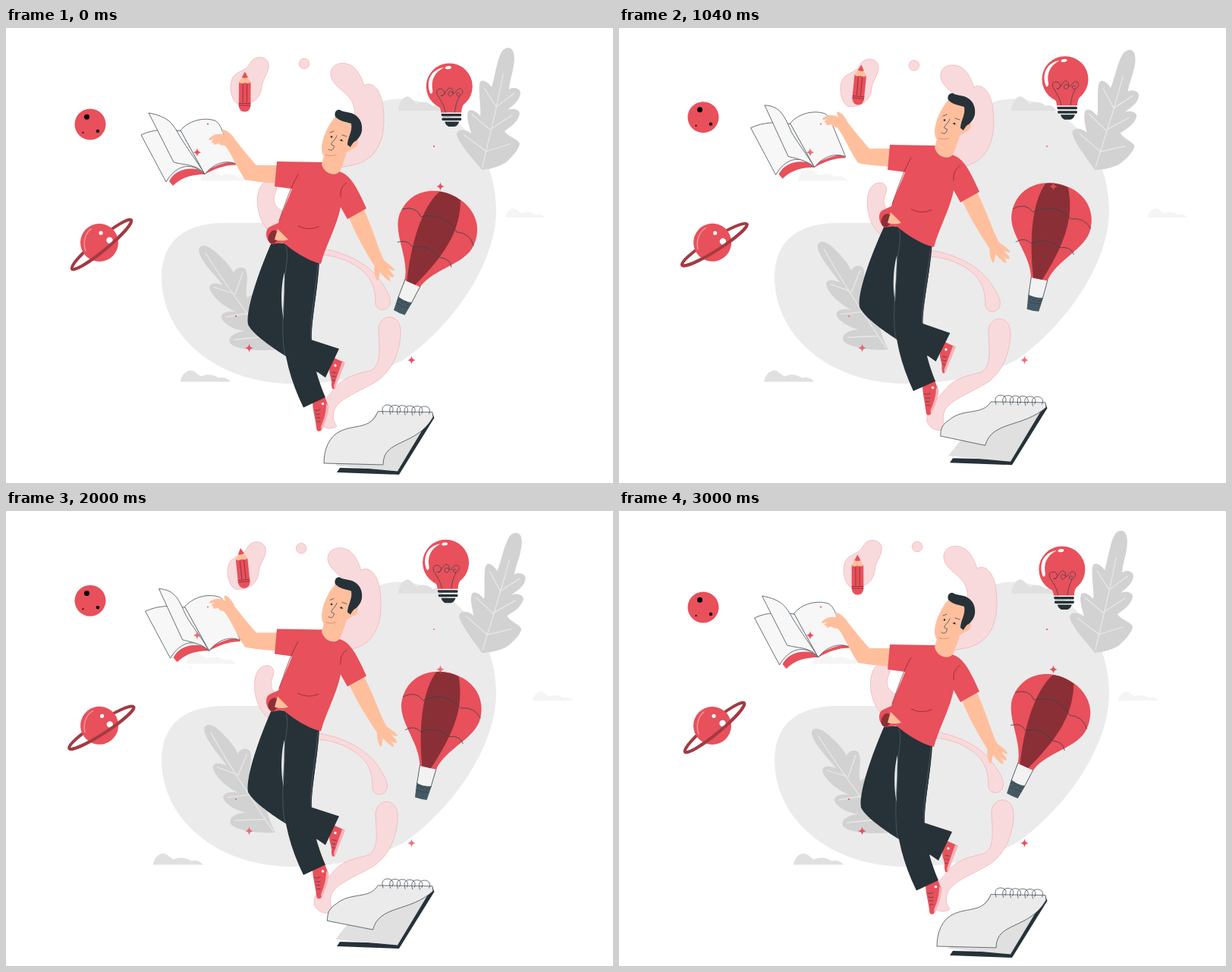
Write an HTML page that moves like this. It is 800 px wide and 600 px high and loops after 3.04 s.

```html
<!DOCTYPE html>
<html lang="en">
<head>
<meta charset="utf-8">
<title>Floating ideas</title>
<style>
html, body { margin: 0; width: 100%; height: 100%; overflow: hidden; background: #fff; }
svg { display: block; width: 800px; height: 600px; }
.red { fill: #e8505b; }
.dark { fill: #263238; }
.skin { fill: #ffbf9d; }
.deep { fill: #8b2f36; }
.leaf { fill: #d2d2d2; }
.pale { fill: #f5f5f5; }
.cloud { fill: #e0e0e0; }
.paper { fill: #f7f7f7; stroke: #59636a; stroke-width: .9; stroke-linejoin: round; }
.ln { fill: none; stroke: #37434a; stroke-width: .75; stroke-linecap: round; stroke-linejoin: round; }
.wine { stroke: #7c2b33; }
.vein { fill: none; stroke: #e8e8e8; stroke-width: 1.3; stroke-linecap: round; }
.pink { fill: #f9dadc; stroke: #f2acb1; stroke-width: .7; }
.ring { fill: none; stroke: #a33a42; stroke-width: 4; }
</style>
</head>
<body>
<svg viewBox="0 0 800 600">
<defs>
  <path id="puff" d="M0 0C1-8 6-14 13-15C18-15 22-10 27-7C35-11 45-9 50-5C57-7 63-4 66 0Z"/>
  <path id="star" class="red" d="M0-5.7C.8-1.7 1.7-.8 5.7 0C1.7.8.8 1.7 0 5.7C-.8 1.7-1.7.8-5.7 0C-1.7-.8-.8-1.7 0-5.7Z"/>
</defs>

<path fill="#ebebeb" d="M345 257C395 257 410 230 425 195C440 150 465 98 510 94C575 88 646 150 646 240C646 310 590 391 525 437C480 461 430 469 375 469C275 467 205 405 205 328C206 280 236 257 290 257Z"/>
<use href="#puff" class="cloud" transform="translate(517 109) scale(.9 1.25)"/>
<use href="#puff" class="cloud" id="cloudL"/>
<use href="#puff" class="pale" id="cloudM"/>
<use href="#puff" class="pale" id="cloudR"/>

<g id="leafR">
  <path class="leaf" d="M627 187C618 175 594 150 594 139C596 132 608 134 613 139C611 130 606 118 609 110C613 105 622 112 625 116C627 108 621 78 625 71C629 66 638 74 640 78C645 65 648 30 658 27C668 22 672 35 669 50C667 62 664 70 663 81C668 77 678 79 678 86C677 96 668 102 661 108C668 105 677 107 677 113C675 124 664 131 657 136C662 144 677 147 677 153C675 162 665 172 658 178C648 183 640 186 627 187Z"/>
  <path class="vein" d="M628 183C634 155 645 115 655 62M632 162L604 141M632 163L664 153M638 134L614 114M638 134L667 115M646 104L630 79M646 104L670 86"/>
</g>
<g id="leafL">
  <path class="leaf" d="M355 424C335 427 300 424 295 415C292 406 305 400 316 400C300 398 283 388 284 380C286 373 300 373 306 375C290 370 270 354 268 342C270 334 280 337 286 339C275 325 253 304 254 291C258 283 268 288 277 296C288 306 296 314 300 323C302 316 312 313 316 319C321 330 314 345 318 356C324 350 334 350 335 360C338 375 338 395 355 424Z"/>
  <path class="vein" d="M263 297C285 332 320 380 352 422M300 350L274 342M302 351L312 322M319 376L290 381M340 407L301 411"/>
</g>

<g id="blobs" class="pink">
  <path d="M306 101C298 96 294 82 297 70C300 56 317 58 322 46C327 36 343 36 346 47C348 58 338 66 337 78C336 92 325 102 306 101Z"/>
  <circle cx="393" cy="47" r="6.8"/>
  <path d="M428 62C427 46 445 43 456 50C466 57 470 70 472 76C480 70 492 78 496 98C501 130 497 155 480 170C468 180 455 181 440 184L440 150C460 130 464 112 455 95C446 82 430 76 428 62Z"/>
  <path d="M345 202C353 200 359 206 356 215C351 226 352 236 366 242C400 265 400 288 416 291C455 297 482 316 494 334C503 347 508 356 506 364C503 374 489 374 487 364C487 350 486 338 474 324C458 308 435 300 414 299C380 295 345 275 336 252C328 232 330 205 345 202Z"/>
  <path d="M491 400C490 388 498 381 506 381C517 382 521 393 520 405C518 430 508 452 490 465C465 480 440 488 433 503C430 514 431 518 436 525C428 531 414 528 410 516C409 498 425 486 438 470C450 458 468 455 480 452C496 446 492 420 491 400Z"/>
</g>

<g id="moon">
  <circle class="red" cx="111" cy="127" r="20.5"/>
  <circle cx="106.5" cy="117.2" r="3.5"/><circle cx="121" cy="136" r="2.2"/><circle cx="101.5" cy="138" r="1"/>
</g>
<g id="saturn">
  <ellipse class="ring" cx="126" cy="285.5" rx="50.5" ry="8" transform="rotate(-39.6 126 285.5)"/>
  <circle class="red" cx="123" cy="283" r="25"/>
  <path fill="none" stroke="#f08f96" stroke-width="1.6" stroke-linecap="round" d="M105 294C101 283 104 271 112 265"/>
  <circle cx="125" cy="270.3" r="2.6" fill="#fff"/><circle cx="136.5" cy="280" r="4.2" fill="#fff"/>
  <path class="ring" transform="rotate(-39.6 126 285.5)" d="M75.5 285.5A50.5 8 0 0 0 176.5 285.5"/>
</g>

<g id="pencil">
  <path class="red" d="M306.7 71H322.3V103Q321 110.5 314.5 110.5Q308 110.5 306.7 103Z"/>
  <path class="skin" d="M314.5 58L322.3 72Q318 74 314.5 72Q311 74 306.7 72Z"/>
  <path class="red" d="M314.5 57.5L318.5 65Q314.5 67 310.5 65Z"/>
  <path class="ln wine" d="M312 74V98M317.3 74V98M307 99.5H322M307 102H322"/>
</g>

<g id="bulb">
  <circle class="red" cx="584" cy="77" r="30.5"/>
  <path class="red" d="M566 100Q573 104 573 111.5H600Q600 104 604 99Z"/>
  <path fill="#fff" d="M558 84C553 67 562 54 577 52C565 58 559 68 562 83C562 87 559 88 558 84Z"/>
  <ellipse cx="582.5" cy="52.3" rx="4" ry="2" fill="#fff" transform="rotate(-8 582 52)"/>
  <path class="ln" d="M579 111C577 102 573 96 570 91C564 84 569 78 575 81C580 84 577 91 573 89C577 92 580 79 585 79C590 80 590 89 585 90C580 88 583 81 588 85C591 90 592 81 598 80C604 81 602 89 596 90C591 88 594 83 598 87M591 111Q592 100 597 90"/>
  <path class="dark" d="M574 113H599Q601 115 599 116.5H575Q572 115 574 113ZM575 118.5H599Q601 120 599 122H575Q573 120 575 118.5ZM578 123.5H597Q595 129 591 130H583Q579 128 578 123.5Z"/>
</g>

<g id="book">
  <path class="red" d="M-47 9L-42 15C-30 3-15 0 0 0C14-8 30-13 41-12L39-17C22-16 10-9 0-4C-18-11-38-8-47 9Z"/>
  <path class="paper" d="M-84-52C-67-60-48-60-31-57L0 0C-17-17-38-13-51 10Z"/>
  <path class="paper" d="M0 0L-32-58C-22-70-3-76 13-71C18-69 20-64 22-60L41-14C26-20 10-13 0 0Z"/>
  <path class="paper" id="leafPage"/>
</g>

<g id="balloon">
  <path d="M-11 75L-9 100H9L11 75Z" fill="#f2f2f2"/>
  <path class="ln" d="M-11 75L-9.5 100M11 75L9.5 100"/>
  <path class="red" d="M-11 76C-18 45-53 25-53-3C-53-35-28-52 0-52C28-52 53-35 53-3C53 25 18 45 11 76Z"/>
  <path class="deep" d="M-17-49.5C-27-28-28 14-8 76H4C25 20 28-14 13-50Q-2-54-17-49.5Z"/>
  <path class="ln" d="M-52.5-8Q-38-20-26-9Q0-28 25-10Q42-16 53-3M-40 34Q-30 25-20 32Q0 19 18 30Q32 25 38 35"/>
  <path fill="#455a64" d="M-10 99Q0 102 10 99L8 118Q0 119-8 118Z"/>
  <path class="ln" d="M-9 104L-5 101L-2 105L2 101L5 105L9 102M-8 108Q0 110 8 108"/>
</g>

<g id="man">
  <g id="legs">
    <path class="red" d="M430 434L446 441L434 474Q430 480 429 471C430 460 424 456 427 447Z"/>
    <path fill="#f4b4b9" d="M443 440L447 441.5L433 477L432 472Z"/>
    <path class="ln" d="M430 454L435 455M430 459L434 460M430 464L433 465"/>
    <circle cx="434" cy="445" r="1.7" fill="#fff"/>
    <path class="red" d="M404 492L420 486L425 499C424 510 418 525 415 531Q409 534 409 526C407 512 404 502 404 492Z"/>
    <path fill="#f4b4b9" d="M422 495L425.5 499C425 511 420 522 416 531L415 526C420 514 422 506 422 495Z"/>
    <path class="ln" d="M407 504Q411 506 414 503M408 509Q411 511 414 509M409 514L414 514M410 519L414 519"/>
    <circle cx="417.5" cy="495.5" r="1.8" fill="#fff"/>
    <path class="dark" d="M350 283L370 284L412 308C412 340 403 380 402 411L439 423L421 461L411 454C385 445 327 409 319 391C315 368 340 305 350 283Z"/>
    <path fill="#e6e6e6" d="M367 322C362 340 362 368 366 384Q367 360 367 322Z"/>
    <path class="dark" d="M368 285L413 309C411 345 402 385 403 412C403 440 413 468 421 487L392 500.5C375 465 365 430 366 395C366 360 369 310 368 285Z"/>
    <path class="ln" style="stroke:#536067" d="M369 288C374 303 366 320 367 350C364 385 364 420 368 432M411 312C408 350 400 385 402 411"/>
  </g>
  <g id="armR" class="skin">
    <path d="M446 240L470 236C483 262 488 285 498 306L486 315C474 295 462 275 452 250Z"/>
    <path d="M486 312C484 320 486 328 489 333C492 333 491 327 493 322C498 328 503 333 506 334C508 331 503 326 501 323C505 328 510 330 511 328C511 324 505 320 504 317C508 319 512 322 512 319C508 313 502 310 496 304Z"/>
  </g>
  <path class="skin" d="M360 181L358 205C340 204 325 202 315 200C303 182 297 165 288 154L298 142C308 155 320 170 330 181Z"/>
  <path id="hand" class="skin" d="M301 146C297 139 291 135 286 134C283 136 287 139 288 141C280 138 271 141 267 147C268 149 272 147 275 146C270 149 269 152 274 151C271 155 277 154 280 152C283 156 287 154 291 156Q299 154 301 146Z"/>

  <path class="red" d="M357 176L417 177L441 190C453 194 462 208 475 238L450 252L441 236C436 262 422 285 415 311C395 306 378 293 365 283L350 285C341 279 341 265 348 262L359 257C365 240 372 225 377 212L354 209Z"/>
  <ellipse class="deep" cx="352.5" cy="275.5" rx="6.5" ry="9" transform="rotate(20 352 275)"/>
  <path class="skin" d="M358 265L372 279Q363 282 354 279Z"/>
  <path class="ln wine" d="M385 193C375 210 368 232 360 254M385 261Q398 268 412 262M441 223C440 213 444 207 449 204"/>

  <path class="skin" d="M421 160L416 180C421 195 437 196 441 187L449 165Z"/>
  <path class="skin" d="M434 117C424 128 416 147 416 159C416 172 425 175 436 171C446 166 455 160 461 157C466 152 464 145 460 142L457 123Z"/>
  <path class="dark" d="M434 117C432 111 436 107 440 108C446 112 453 110 459 114C468 119 470 128 469 136C467 144 463 147 461 149C458 150 456 153 454 157L450 154C450 144 457 137 455 126C448 124 440 123 434 117Z"/>
  <path class="ln" d="M427 138L432 136M443 141L449 143M436 142C435 147 427 152 429 154L433 156M425 160C429 163 432 160 432 157M440 148L444 149"/>
  <path d="M421 167Q428 170 435 167" fill="none" stroke="#ef986f" stroke-width="1.2"/>
  <circle class="dark" cx="429" cy="143.5" r="1.3"/><circle class="dark" cx="442" cy="148" r="1.2"/>
</g>

<g id="pad">
  <path class="dark" d="M440 580L436 586L518 589L564.5 514L562 508L515 582Z"/>
  <path class="cloud" d="M490 506L562 508L516 584.5L434 577Z"/>
  <path id="sheet" class="ln" style="fill:#ebebeb"/>
  <g id="rings"></g>
</g>

<g id="sparks"></g>
</svg>
<script>
const LOOP = 3040, STEP = 40, LEAD = 30;
const el = Object.fromEntries([...document.querySelectorAll('[id]')].map(n => [n.id, n]));
const put = (id, v) => el[id].setAttribute('transform', v);
const move = (id, x, y) => put(id, `translate(${x} ${y})`);
const turn = (id, a, x, y) => put(id, `rotate(${a} ${x} ${y})`);

el.rings.innerHTML = [0, 1, 2, 3, 4, 5].map(i =>
  `<path class="ln" transform="translate(${497 + i * 9.7} ${509 + i * .4})" d="M0 0C-3-9 1-12 6-12C12-12 15-7 12-2"/>`).join('');
el.sparks.innerHTML =
  [[252, 164], [572.5, 209], [320.5, 422], [534.5, 438]].map(([x, y]) => `<use href="#star" x="${x}" y="${y}"/>`).join('') +
  [[266, 126.5], [564, 156], [303, 380]].map(([x, y]) => `<circle class="red" cx="${x}" cy="${y}" r="1.1"/>`).join('');

// Fill a path template: [from, to] pairs blend by k.
const blend = (k, parts) => parts.map(v => Array.isArray(v) ? v[0] + (v[1] - v[0]) * k : v).join(' ');

function draw(now) {
  const t = Math.floor(now % LOOP / STEP) * STEP;
  const a = 2 * Math.PI * (t + LEAD) / LOOP;
  const s = Math.sin(a), c = Math.cos(a), c2 = Math.cos(2 * a);
  const p = (1 - c) / 2, mid = s * s;
  const rise = -11.7 * p;

  move('cloudL', 230 - 48.5 * p, 466.5);
  move('cloudM', 256 - 25 * p, 201.5);
  put('cloudR', `translate(${658 + 48.5 * p} 250) scale(.8)`);
  turn('leafR', 5.2 * p, 627, 187);
  turn('leafL', 4.1 * p, 354, 424);
  move('blobs', -5.2 * p, 3 * p);

  move('moon', 0, rise);
  turn('saturn', 9 * p, 124.5, 284);
  put('pencil', `translate(0 ${rise}) rotate(${6.8 * s} 314.5 110)`);
  move('bulb', 5 * s, rise);
  move('book', 262.4 - 6 * s, 193 + rise);
  put('balloon', `translate(${569.5 - 2.6 * c - 2.4 * s} ${263 + 5 * c - 4.2 * s}) rotate(${16.3 + 6.5 * c - .5 * s + 1.5 * c2})`);

  move('man', 0, -27.5 * p);
  turn('legs', 1.1 * Math.max(0, Math.cos(a - 2.1)), 378, 285);
  turn('armR', -3.5 * mid, 458, 235);
  turn('hand', 15 * mid, 298, 148);

  move('pad', 0, -16 * p);
  el.leafPage.setAttribute('d', blend(p, ['M', [-74, -63.5], [-81, -82], 'C', [-47, -44], [-76, -82],
    [-42, -39], [-66, -68], [-34, -29], [-52, -44], 'C', -22, -32, -10, -17, 0, 0,
    'C', -10, [-14, -9], -28, [-12, -12], [-41, -33], [-16, -14], 'Z']));
  el.sheet.setAttribute('d', blend(p, ['M', 490, 506, 'C', [481, 478], [530, 523], [460, 453], [522, 511],
    [440, 434], [532, 529], 'C', [426, 426], [539, 535], [419, 425], [555, 537], [419, 425], [574, 545],
    'L', [497, 479], [576, 560], 'C', [497, 490], [541, 528], [540, 530], [553, 537], 563, 513, 'L', 562, 507, 'Z']));
  el.sparks.setAttribute('opacity', .87 + .13 * c2);
}

const start = performance.now();
function tick() {
  draw(performance.now() - start);
  requestAnimationFrame(tick);
}
tick();
</script>
</body>
</html>
```
